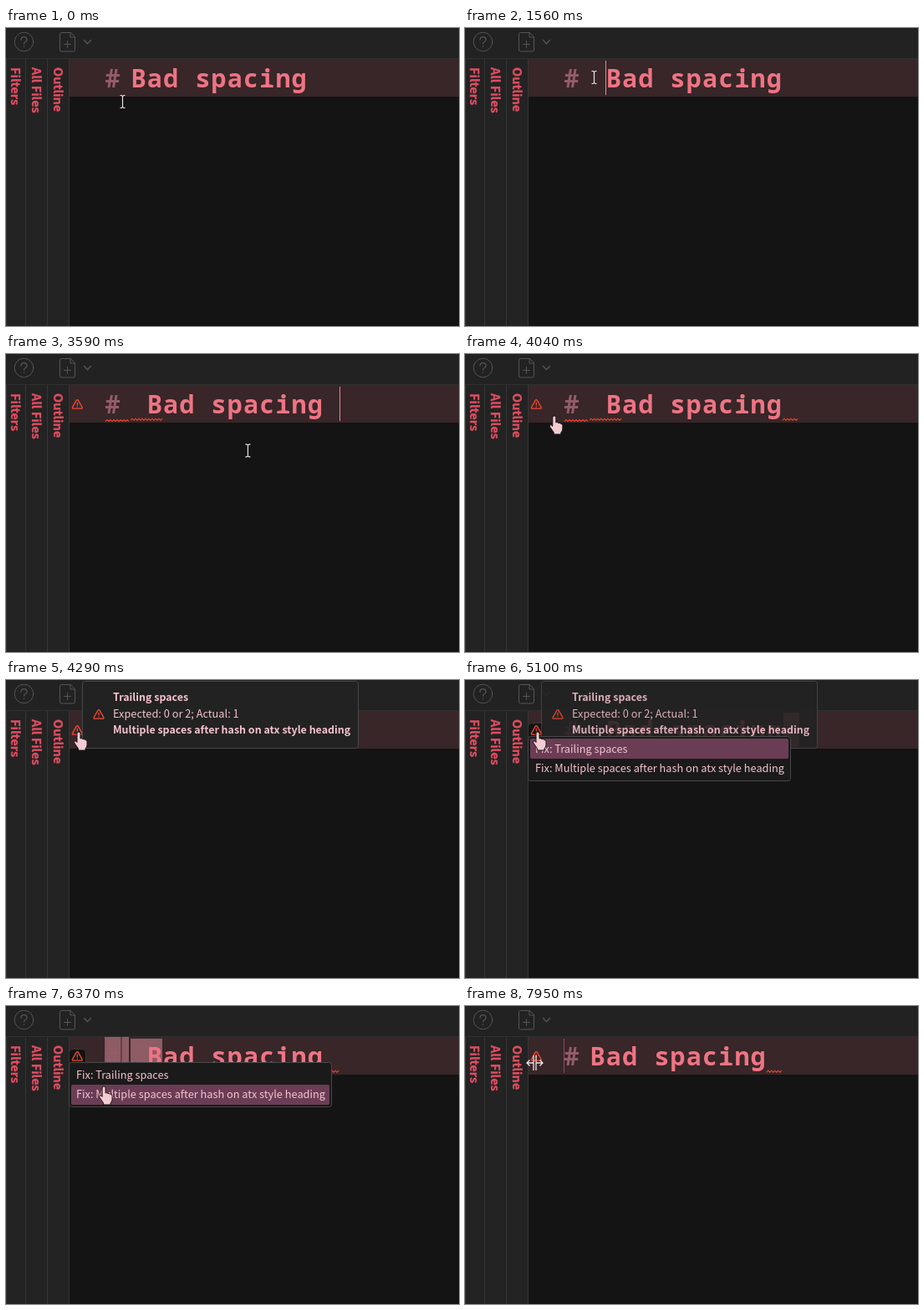
These frames come from a looping animation (542x356 px, 8000 ms). An HTML page:

```html
<!DOCTYPE html>
<html lang="en">
<head>
<meta charset="utf-8">
<title>Heading lint</title>
<style>
  html, body { margin: 0; height: 100%; overflow: hidden; background: #141414; }
  svg { display: block; width: 100vw; height: 100vh; }
  text { font: 12.75px "Noto Sans CJK JP", "Noto Sans CJK SC", "Noto Sans", sans-serif; fill: #f5c3ce; white-space: pre; }
  .bold { font-size: 12.45px; font-weight: 700; }
  .side text { font-size: 14.5px; font-weight: 700; fill: #df4e61; stroke: #df4e61; stroke-width: .35; }
  .code { font: 700 30px "Noto Sans Mono", "DejaVu Sans Mono", monospace; letter-spacing: 1.2px; fill: #ee7484; }
  .code.mark { fill: #925c68; }
  .icons { fill: none; stroke: #555; stroke-linecap: round; stroke-linejoin: round; }
  .wave { fill: none; stroke: #f2432f; stroke-width: 1.1; }
  .sel { fill: #8e5c64; }
  .box { stroke: #484848; }
</style>
</head>
<body>
<svg viewBox="0 0 542 356" preserveAspectRatio="none">
  <defs>
    <path id="warn" d="M0-5.3Q.7-5.3 1.1-4.6L5.8 3.6Q6.3 5.2 4.8 5.2H-4.8Q-6.3 5.2-5.8 3.6L-1.1-4.6Q-.7-5.3 0-5.3ZM0-1.8V1M0 3V3.1"
      fill="none" stroke="#f04b35" stroke-width="1.3" stroke-linecap="round" stroke-linejoin="round"/>
  </defs>

  <rect width="542" height="37" fill="#222"/>
  <path d="M0 36.5H542" stroke="#303030"/>
  <rect x="76" y="37" width="466" height="45" fill="#382628"/>
  <g class="side">
    <rect y="37" width="76" height="319" fill="#232323"/>
    <path d="M.5 37V356M23.5 37V356M49.5 37V356M75.5 37V356" stroke="#363636"/>
    <text transform="translate(5.5 47)rotate(90)">Filters</text>
    <text transform="translate(31 47)rotate(90)">All Files</text>
    <text transform="translate(57 47)rotate(90)">Outline</text>
  </g>
  <g class="icons">
    <circle cx="21.5" cy="16.5" r="11.3"/>
    <path d="M18 14.2Q18 10.7 21.5 10.7T25 14Q25 15.6 23 16.7 21.5 17.5 21.5 19M21.5 22V22.3" stroke-width="1.3"/>
    <path d="M77 5.5H66.5Q64.5 5.5 64.5 7.5V26Q64.5 28 66.5 28H80.5Q82.5 28 82.5 26V11ZM77 5.5V11H82.5M73.5 15.5V23.5M69.5 19.5H77.5"/>
    <path d="M93.5 14.5L97.5 18.7 101.5 14.5" stroke-width="1.4"/>
  </g>

  <rect id="selEnd" class="sel" x="381" y="39" width="19" height="41"/>
  <g id="selStart" class="sel">
    <rect x="118" y="37" width="19.5" height="43"/>
    <rect x="138.5" y="37" width="8.5" height="43"/>
    <rect x="149" y="39" width="38" height="41"/>
  </g>
  <text class="code mark" x="118.4" y="71">#</text>
  <text class="code" id="title" y="71">Bad spacing</text>
  <g id="startWaves"></g>
  <g id="endWave"></g>
  <rect id="caret" y="39" width="1" height="41"/>

  <rect id="iconBack" x="75.5" y="51.5" width="20" height="20" rx="4" fill="#131313" stroke="#383838"/>
  <use id="icon" href="#warn" x="85.3" y="60"/>

  <g id="tip">
    <rect class="box" x="91.5" y="1.5" width="330" height="80" rx="3" fill="#222"/>
    <use href="#warn" x="111" y="41"/>
    <text class="bold" x="128" y="25">Trailing spaces</text>
    <text x="128" y="45">Expected: 0 or 2; Actual: 1</text>
    <text class="bold" x="128" y="64">Multiple spaces after hash on atx style heading</text>
  </g>
  <g id="menu">
    <rect class="box" x="75.5" y="67.5" width="314" height="53" rx="3" fill="#1a1a1a"/>
    <rect id="choice" x="78" width="309" height="24" rx="2" fill="#6b3d55"/>
    <text x="84" y="86.5">Fix: Trailing spaces</text>
    <text x="84" y="110">Fix: Multiple spaces after hash on atx style heading</text>
  </g>

  <g id="mouse">
    <path id="beam" d="M-2.5-7.5H-1L.5-6.5 2-7.5H3.5M.5-6.5V6.5M-2.5 7.5H-1L.5 6.5 2 7.5H3.5" fill="none" stroke="#eee2e4" stroke-width="1.2"/>
    <path id="hand" d="M-2 2A2 2 0 0 1 2 2V8Q4 7 5 8.7 7 8 7.8 9.7 10 9 10 11.5V15.5Q10 18 8 20V22H-.5V20L-5.3 13Q-5.8 10.5-3.8 10.7L-2 12.5Z" fill="#f3ccd3" stroke="#191516"/>
    <path id="resize" d="M-1.5-9V9M1.5-9V9M-2 0H-9M2 0H9M-6-3.5L-9.5 0-6 3.5M6-3.5L9.5 0 6 3.5" fill="none" stroke="#f0dfe2" stroke-width="1.3"/>
  </g>
</svg>
<script>
const $ = id => document.getElementById(id);
const LOOP = 8000, BLINK = 600;
const typed = 1560, linted = 2070, trailingLinted = 3740, hovered = 4040;
const menuOpened = 5100, secondChosen = 6280, fixed = 7400;

const cell = n => 149.6 + 19.2 * n;
const ramp = (t, from, to) => Math.min(1, Math.max(0, (t - from) / (to - from)));
const set = (id, name, value) => $(id).setAttribute(name, value);
const show = (id, on) => set(id, 'display', on ? 'inline' : 'none');

function wave(x, y, width) {
  let d = `M${x} ${y + 1.5}`;
  for (let i = 2; i <= width; i += 2) d += `L${x + i} ${y + (i % 4 ? -.5 : 1.5)}`;
  return `<path class="wave" d="${d}"/>`;
}
$('startWaves').innerHTML = wave(119, 79, 28) + wave(149, 77.7, 38);
$('endWave').innerHTML = wave(0, 77.7, 19);

// Each glide leaves from where the previous one stopped; dip bows it downwards.
const glides = [
  { from: 189, to: 190, x: 154, y: 68 },
  { from: 820, to: 1000, x: 154, y: 59 },
  { from: 1980, to: 2420, x: 433, y: 62 },
  { from: 3235, to: 4090, x: 87, y: 62, dip: 55 },
  { from: 6080, to: 6380, x: 118, y: 97 },
  { from: 7399, to: fixed, x: 113, y: 96 },
  { from: 7710, to: 7950, x: 83.5, y: 68 }
];

function mouseAt(t) {
  let x = 139, y = 88;
  for (const g of glides) {
    const k = ramp(t, g.from, g.to);
    x += (g.x - x) * k;
    y += (g.y - y) * k + (g.dip || 0) * 4 * k * (1 - k);
  }
  return [x, y];
}

// Every click or key press shows the caret for one blink.
const carets = [
  { at: 550, x: cell(0) },
  { at: typed, x: cell(1) },
  { at: 2130, x: cell(12) },
  { at: 3090, x: cell(13) },
  { at: secondChosen, x: 118, fill: '#85506a' },
  { at: fixed, x: 118, fill: '#85506a' }
];

function drawCaret(t) {
  const caret = carets.find(c => t >= c.at && t < c.at + BLINK);
  show('caret', caret);
  if (!caret) return;
  set('caret', 'x', Math.floor(caret.x));
  set('caret', 'fill', caret.fill || '#ea8593');
}

function drawMouse(t) {
  const [x, y] = mouseAt(t);
  const hand = t >= hovered && t < fixed;
  const resize = t >= fixed && x < 90;
  set('mouse', 'transform', `translate(${x} ${y})`);
  show('hand', hand);
  show('resize', resize);
  show('beam', !hand && !resize);
}

function draw(t) {
  const menu = t >= menuOpened && t < fixed;
  const second = t >= secondChosen;
  const doubled = t >= typed && t < fixed;

  set('title', 'x', cell(doubled ? 1 : 0));
  show('startWaves', t >= linted && t < fixed);
  show('endWave', t >= trailingLinted);
  set('endWave', 'transform', `translate(${cell(doubled ? 12 : 11)} 0)`);
  show('icon', t >= linted);
  show('iconBack', menu);
  show('menu', menu);
  set('choice', 'y', second ? 94 : 70);
  show('selEnd', menu && !second);
  show('selStart', menu && second);
  set('tip', 'opacity', ramp(t, 4140, 4290) - ramp(t, 5050, 5450));
  drawCaret(t);
  drawMouse(t);
}

const begin = performance.now();
function tick() {
  draw((performance.now() - begin) % LOOP);
  requestAnimationFrame(tick);
}
tick();
</script>
</body>
</html>
```
